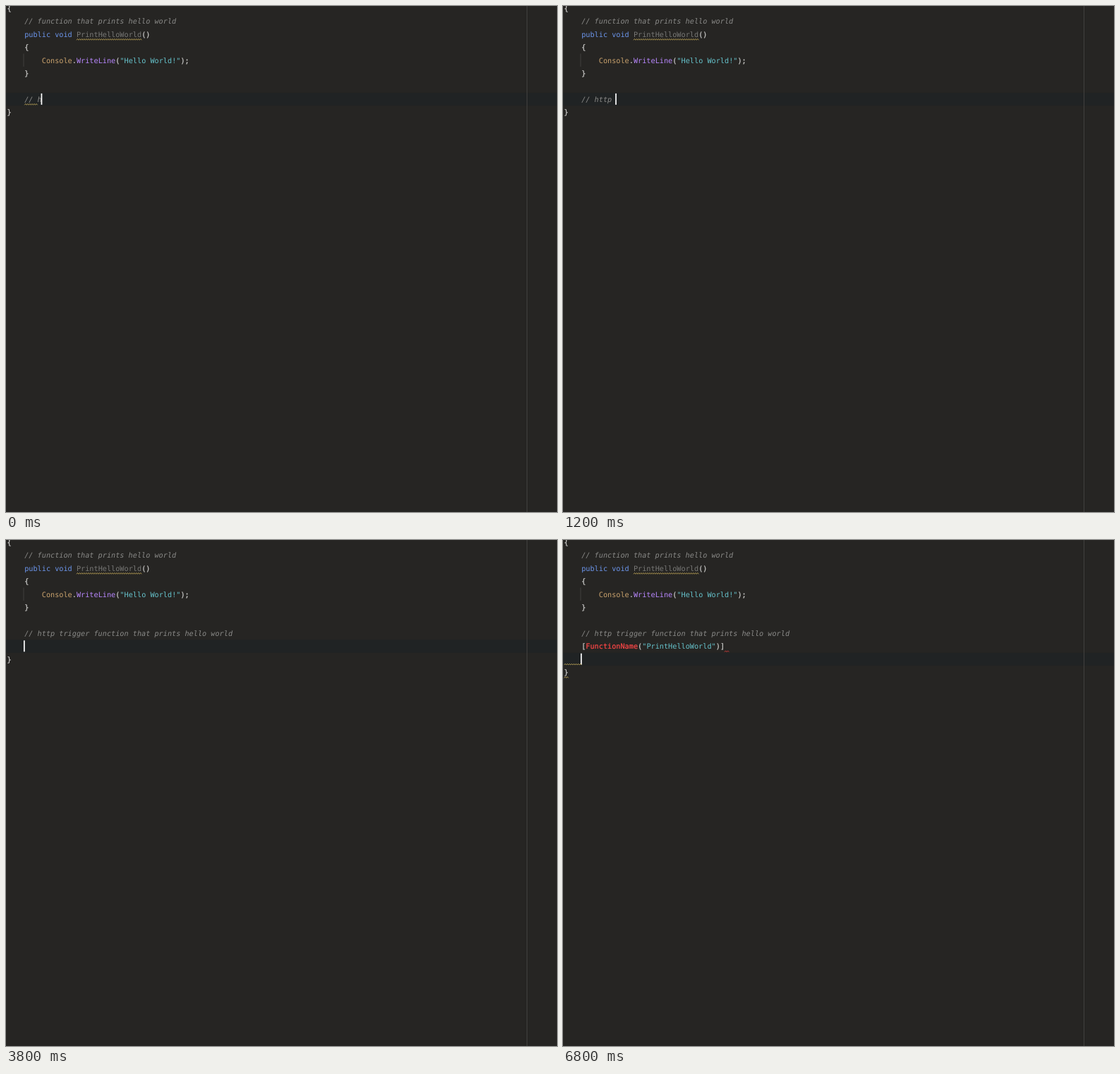
These frames come from a looping animation (781 px wide and 717 px high, 8000 ms). An HTML page:

```html
<!DOCTYPE html>
<html lang="en">
<head>
<meta charset="utf-8">
<title>Code editor</title>
<style>
  html, body { margin: 0; width: 100%; height: 100%; overflow: hidden; background: #262523; }
  svg { display: block; width: 781px; height: 717px; }
  text {
    font: 10.21px "DejaVu Sans Mono", monospace;
    text-rendering: geometricPrecision;
    white-space: pre;
  }
  .note { fill: #8a8a88; font-style: italic; }
  .ghost { fill: #6f7070; font-style: italic; }
  .key { fill: #6c95eb; }
  .dim { fill: #787876; }
  .type { fill: #c9a26d; }
  .call { fill: #b988ff; }
  .str { fill: #66c3cc; }
  .op { fill: #d2d2d0; stroke: #d2d2d0; stroke-width: .2; }
  .bad { fill: #ff4747; stroke: #ff4747; stroke-width: .2; }
</style>
</head>
<body>
<svg id="stage" viewBox="0 0 781 717"></svg>
<script>
const LOOP = 8000, CW = 6.147, LH = 18.4;
const COMMENT = "// http trigger function that prints hello world";
const LINK = "s://docs.example.org/guides/functions/http-trigger/getting-started/hello-world?lang=csharp&v=3";
const ATTR = '[FunctionName("PrintHelloWorld")]';
const stage = document.getElementById("stage");

const colX = c => 1.6 + c * CW;
const rowY = r => 3.1 + r * LH;

const escape = s => s.replace(/&/g, "&amp;").replace(/</g, "&lt;");
const rect = (x, y, w, h, fill) =>
  `<rect x="${x}" y="${y}" width="${w}" height="${h}" fill="${fill}"/>`;
const text = (row, col, cls, s, dy = 0) =>
  `<text class="${cls}" x="${colX(col)}" y="${rowY(row) + 3.8 + dy}">${escape(s)}</text>`;

// Parts alternate class and string, laid out one after another.
function line(row, col, ...parts) {
  let out = "";
  for (let i = 0; i < parts.length; i += 2) {
    out += text(row, col, parts[i], parts[i + 1]);
    col += parts[i + 1].length;
  }
  return out;
}

function wave(row, col, len, color = "#b8a055") {
  const x = colX(col), y = rowY(row) + 8.4, n = Math.round(len * CW / 1.54);
  let d = "";
  for (let i = 0; i <= n; i++) d += `${i ? "L" : "M"}${x + i * 1.54} ${y - (i % 2) * 1.8}`;
  return `<path d="${d}" fill="none" stroke="${color}" stroke-width=".9"/>`;
}

const band = row => rect(0, rowY(row) - 9, 781, LH, "#202324");
const caret = (row, col) => rect(colX(col) - 1.2, rowY(row) - 8, 1.7, 16, "#fff");

const FIXED =
  rect(738, 0, 1, 717, "#41413f") +
  rect(24.5, 67.5, 1, 18.4, "#41413f") +
  line(0, 0, "op", "{") +
  line(1, 4, "note", "// function that prints hello world") +
  line(2, 4, "key", "public void", "op", " ", "dim", "PrintHelloWorld", "op", "()") +
  wave(2, 16, 15) +
  line(3, 4, "op", "{") +
  line(4, 8, "type", "Console", "op", ".", "call", "WriteLine", "op", "(",
    "str", '"Hello World!"', "op", ");") +
  line(5, 4, "op", "}");

// Typed length of the comment: [time, characters]
const TYPED = [[0, 4], [600, 5], [700, 6], [800, 7], [1200, 8], [1300, 9],
  [1400, 11], [1500, 13], [2600, COMMENT.length]];
const typedAt = t => TYPED.filter(k => k[0] <= t).pop()[1];

function comment(t) {
  const n = typedAt(t);
  let out = text(7, 4, "note", COMMENT.slice(0, n));
  if (t < 1200) out += wave(7, 4, 3);
  if (t >= 1000 && t < 1200) out += text(7, 4 + n, "ghost", LINK);
  if (t >= 1600 && t < 2600) out += text(7, 4 + n, "ghost", COMMENT.slice(n));
  const at = t >= 800 && t < 900 ? 6 : t >= 2600 && t < 2700 ? 13 : n;
  if (t < 2300 || t >= 2600) out += caret(7, 4 + at);
  return out + line(8, 0, "op", "}");
}

function attribute(t) {
  const checked = t >= 5000, open = t < 6500;
  let out = text(7, 4, "note", COMMENT);
  if (t >= 4100 && t < 5200) out += wave(7, 4, 2);
  if (t < 4900) {
    if (t >= 4100) out += wave(8, 0, 4);
    if (t >= 4300) out += text(8, 4, "ghost", ATTR, .7);
    out += caret(8, 4);
  } else {
    if (checked && open)
      for (const c of [4, 36]) out += rect(colX(c), rowY(8) - 8, CW, 16, "#3f2b40");
    out += line(8, 4, "op", "[", checked ? "bad" : "op", "FunctionName", "op", "(",
      "str", '"PrintHelloWorld"', "op", ")]");
    if (checked) out += wave(8, 37, 1, "#d03c3c");
    out += open ? caret(8, 37) : caret(9, 4);
  }
  if (t >= 6800) out += wave(9, 0, 4);
  const last = open ? 9 : 10;
  out += line(last, 0, "op", "}");
  if (t >= 4100 && (open || t >= 6600)) out += wave(last, 0, 1);
  return out;
}

function draw(t) {
  const row = t < 3800 ? 7 : t < 6500 ? 8 : 9;
  stage.innerHTML = band(row) + FIXED + (t < 3800 ? comment(t) : attribute(t));
}

let start;
function tick(now) {
  start ??= now;
  draw((now - start) % LOOP);
  requestAnimationFrame(tick);
}
draw(0);
requestAnimationFrame(tick);
</script>
</body>
</html>
```
